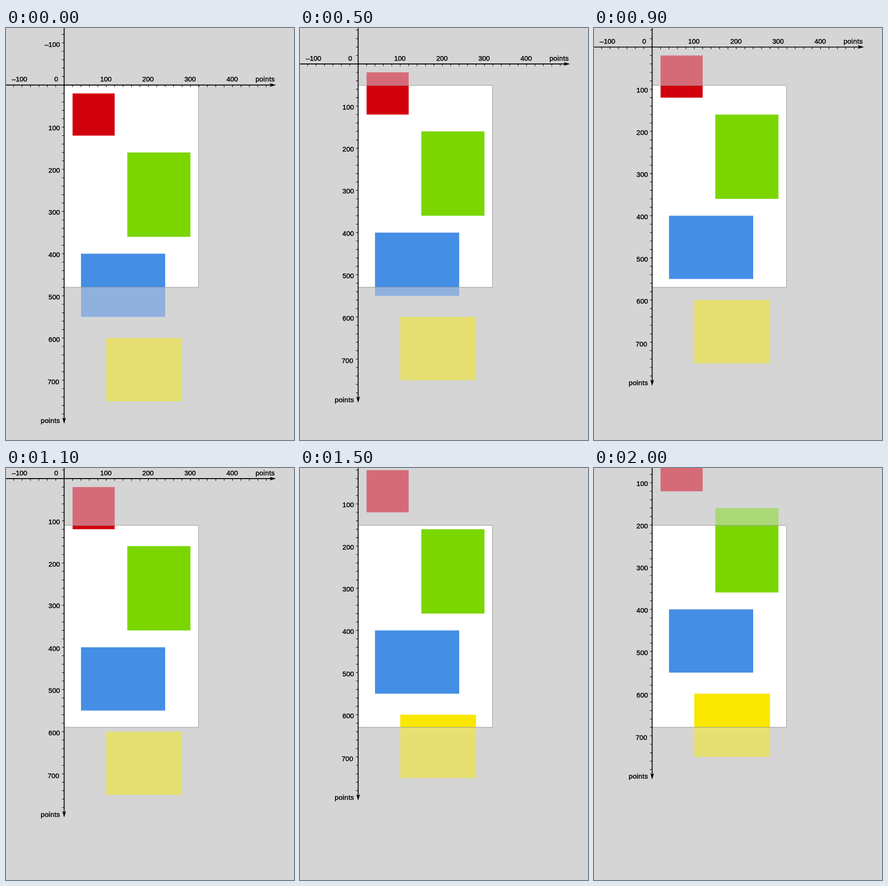
Recreate the animation shown at these times as an HTML page. Size 626x894 px, loop 2.1 s.

```html
<!DOCTYPE html>
<html lang="en">
<head>
<meta charset="utf-8">
<title>Scrolling bounds</title>
<style>
  html, body { margin: 0; width: 100%; height: 100%; overflow: hidden; background: #d5d5d5; }
  svg { display: block; width: 626px; height: 894px; }
  text {
    font: 15px "Liberation Sans", Arial, sans-serif;
    fill: #000; stroke: #000; stroke-width: .5px;
  }
  .word { letter-spacing: .35px; }
</style>
</head>
<body>
<svg viewBox="0 0 626 894">
  <defs>
    <clipPath id="view"><rect x="126" y="124" width="293" height="439"/></clipPath>
  </defs>
  <g id="faded" class="scroll"></g>
  <rect x="126" y="124" width="293" height="439" fill="#fff"/>
  <g clip-path="url(#view)"><g id="vivid" class="scroll"></g></g>
  <rect x="126.5" y="124.5" width="292" height="438" fill="none" stroke="#969696"/>
  <g id="axes" class="scroll"></g>
</svg>
<script>
const SCALE = 0.915, X0 = 126.4, Y0 = 123.7;
const STEP_MS = 100, STEPS = 21, STEP_POINTS = 10;

const px = v => X0 + v * SCALE;
const py = v => Y0 + v * SCALE;
const byId = id => document.getElementById(id);

function add(parent, tag, attrs, text) {
  const el = document.createElementNS("http://www.w3.org/2000/svg", tag);
  for (const key in attrs) el.setAttribute(key, attrs[key]);
  if (text !== undefined) el.textContent = text;
  parent.append(el);
}

// x, y, width, height in points; colour inside and outside the view
const boxes = [
  [20, 20, 100, 100, "#d2000d", "#d66b78"],
  [150, 160, 150, 200, "#7bd600", "#a9d877"],
  [40, 400, 200, 150, "#458ee6", "#90b1de"],
  [100, 600, 180, 150, "#f9e700", "#e6e072"]
];
for (const [x, y, w, h, inside, outside] of boxes) {
  const box = { x: px(x), y: py(y), width: w * SCALE, height: h * SCALE };
  add(byId("vivid"), "rect", { ...box, fill: inside });
  add(byId("faded"), "rect", { ...box, fill: outside });
}

const axes = byId("axes");
let ticks = "";
for (let v = -120; v <= 480; v += 20) ticks += `M${px(v)} ${Y0}v4.6`;
for (let v = -120; v <= 780; v += 20) ticks += `M${X0} ${py(v)}h-4.6`;
add(axes, "path", { d: ticks, stroke: "#000", "stroke-width": 1.2 });
add(axes, "path", { d: `M0 ${Y0}H580M${X0} 0V852`, stroke: "#000", "stroke-width": 1.9 });

const head = "M0 0L-14 -4L-10.5 0L-14 4Z";
add(axes, "path", { d: head, transform: `translate(587 ${Y0})` });
add(axes, "path", { d: head, transform: `translate(${X0} 859) rotate(90)` });

const label = (text, x, y, anchor, cls = "") =>
  add(axes, "text", { x, y, "text-anchor": anchor, class: cls }, text);

const baseline = 116.4;
label("–100", 29.5, baseline, "middle");
label("0", 109.2, baseline, "middle");
for (const v of [100, 200, 300, 400]) label(v, px(v) - 0.7, baseline, "middle");
label("points", 584.3, baseline, "end", "word");

const rows = [["–100", 41.3], [100, 222.4], [200, 314.2], [300, 404.9],
              [400, 497.2], [500, 589], [600, 680.7], [700, 773.2]];
for (const [text, y] of rows) label(text, text === 700 ? 115.5 : 117.4, y, "end");
label("points", 117.6, 857.4, "end", "word");

const layers = document.querySelectorAll(".scroll");
const start = performance.now();
function draw(now) {
  const step = Math.floor(Math.max(0, now - start) / STEP_MS) % STEPS;
  const shift = -step * STEP_POINTS * SCALE;
  for (const layer of layers) layer.setAttribute("transform", `translate(0 ${shift})`);
  requestAnimationFrame(draw);
}
draw(start);
</script>
</body>
</html>
```
